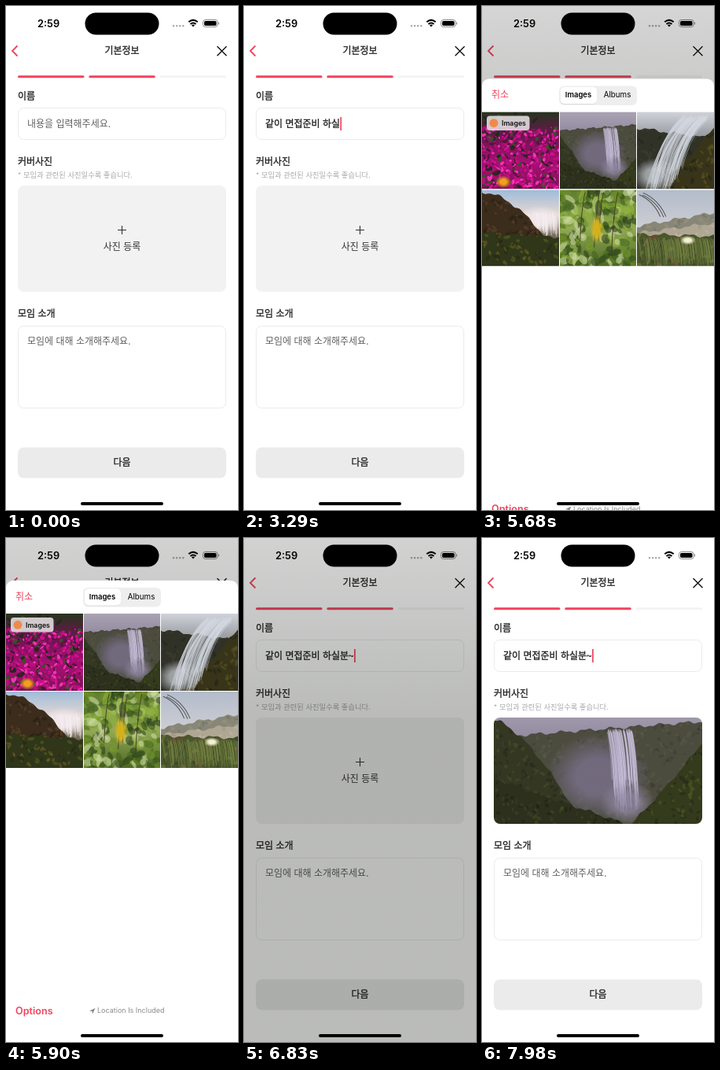
Recreate the animation shown at these times as an HTML page with a canvas. Size 295 by 640 pixels, loop 8000 ms.

```html
<!DOCTYPE html>
<html lang="ko">
<head>
<meta charset="utf-8">
<title>기본정보</title>
<style>
  html, body { margin: 0; width: 100%; height: 100%; overflow: hidden; background: #fff; }
  #stage { position: relative; width: 295px; height: 640px; overflow: hidden; background: #fff; }
  #stage > *, #sheet > svg { position: absolute; left: 0; top: 0; }
  svg { display: block; }
  text { font-family: "Noto Sans CJK KR", "Noto Sans CJK", "Noto Sans KR", sans-serif; font-size: 12px; fill: #333; }
  .en { font-family: Inter, sans-serif; }
  .bold { font-weight: 600; }
  .mid { text-anchor: middle; }
  .medium { fill: #222; stroke: #222; stroke-width: .3px; }
  .hint { fill: #606060; }
  .red { fill: #f0435d; }
  .field { fill: #fff; stroke: #ebebeb; }
  #name { white-space: pre; }
  #stage > #cover { left: 15px; top: 228px; width: 265px; height: 135px; border-radius: 8px; }
  #dim { width: 295px; height: 640px; background: linear-gradient(#0a0f08aa, #0a0f08 35%); }
  #sheet { width: 295px; height: 640px; background: #fff; border-radius: 9px 9px 0 0; }
  #grid { position: absolute; top: 42px; width: 295px; display: grid; grid-template-columns: repeat(3, 1fr); gap: 1px; }
  #grid canvas { display: block; width: 100%; aspect-ratio: 1; }
</style>
</head>
<body>
<div id="stage">
  <svg width="295" height="640">
    <path d="M14.5 50.500 8 57l6.500 6.500" fill="none" stroke="#f0435d" stroke-width="1.800"/>
    <path d="M268.500 51.200l12 12m0-12-12 12" stroke="#111" stroke-width="1.400"/>
    <text class="mid medium" x="147.500" y="61.300">기본정보</text>
    <g class="red">
      <rect x="15" y="88.300" width="84.500" height="3" rx="1.500"/>
      <rect x="105.300" y="88.300" width="84.500" height="3" rx="1.500"/>
      <rect x="195.600" y="88.300" width="84.500" height="3" rx="1.500" fill="#f3f3f3"/>
    </g>
    <text class="medium" x="15" y="118.500">이름</text>
    <rect class="field" x="15.500" y="129.500" width="264" height="40" rx="7"/>
    <text id="name" x="27" y="154"></text>
    <rect id="caret" class="red" y="141" width="1.700" height="17"/>
    <text class="medium" x="15" y="201.500">커버사진</text>
    <text x="15" y="217.800" style="font-size:9.3px;fill:#a9a9a9">* 모임과 관련된 사진일수록 좋습니다.</text>
    <rect x="15" y="228" width="265" height="135" rx="8" fill="#f2f2f2"/>
    <path d="M142 284.500h11m-5.500-5.500v11" stroke="#333" stroke-width="1.100"/>
    <text class="mid" x="147.500" y="309.800">사진 등록</text>
    <text class="medium" x="15" y="395">모임 소개</text>
    <rect class="field" x="15.500" y="406.500" width="264" height="104" rx="7"/>
    <text class="hint" x="27" y="430">모임에 대해 소개해주세요.</text>
    <rect x="15" y="560.500" width="265" height="39" rx="8" fill="#ebebeb"/>
    <text class="mid medium" x="147.500" y="584.300">다음</text>
    <text class="en bold" x="40" y="26.500" style="font-size:12.8px;fill:#000">2:59</text>
    <path d="M213 25.200h12.500" stroke="#aaa" stroke-width="2.600" stroke-linecap="round" stroke-dasharray="0 4.100"/>
    <g fill="none" stroke="#000" stroke-width="2">
      <path d="M232.300 20.300q5.700-4.800 11.400 0M234.500 23q3.500-2.900 7 0"/>
      <path d="M235.900 24.300q2.100-1.500 4.200 0l-2.100 2.200z" fill="#000" stroke="none"/>
      <rect x="250.500" y="17.500" width="18.500" height="9" rx="3" stroke="#888" stroke-width="1"/>
      <rect x="252" y="19" width="15.500" height="6" rx="1.700" fill="#000" stroke="none"/>
      <path d="M270.500 20.500v3" stroke="#999" stroke-width="1.200"/>
    </g>
  </svg>
  <canvas id="cover" width="530" height="270"></canvas>
  <div id="dim"></div>
  <div id="sheet">
    <div id="grid"></div>
    <svg width="295" height="640">
      <text class="red" x="12" y="24.500">취소</text>
      <rect x="98" y="9" width="99" height="24.500" rx="6" fill="#eeeeef"/>
      <rect x="100" y="11" width="46" height="21.500" rx="5" fill="#0001"/>
      <rect x="100" y="10.500" width="46" height="21" rx="5" fill="#fff"/>
      <text class="en bold mid" x="122.500" y="24" style="font-size:9.5px;fill:#000">Images</text>
      <text class="en mid" x="172" y="24" style="font-size:9.8px;fill:#000">Albums</text>
      <rect x="6" y="47" width="54.500" height="18.500" rx="4" fill="#e2dcdfe6"/>
      <circle cx="15" cy="56.300" r="5.500" fill="#f08a4b"/>
      <text class="en bold" x="25" y="59.600" style="font-size:8.8px;fill:#111">Images</text>
      <text class="en bold red" x="12" y="550.700" style="font-size:12.6px">Options</text>
      <path d="M106 546.500l7.500-3.500-3.500 7.500-.5-3.500z" fill="#888"/>
      <text class="en" x="116" y="549.300" style="font-size:9px;fill:#8b8b8b">Location Is Included</text>
    </svg>
  </div>
  <svg width="295" height="640">
    <rect x="100.500" y="8.500" width="94" height="28" rx="14"/>
    <rect x="95" y="630" width="105" height="4" rx="2"/>
  </svg>
</div>
<script>
const $ = id => document.getElementById(id);

let seed = 7;
const rand = () => (seed = seed * 16807 % 2147483647) / 2147483647;

// A drawing surface of w by h units at double resolution.
function surface(w, h) {
  const canvas = document.createElement('canvas');
  canvas.width = w * 2;
  canvas.height = h * 2;
  const c = canvas.getContext('2d');
  c.scale(2, 2);

  function sky(...colors) {
    const g = c.createLinearGradient(0, 0, 0, h);
    colors.forEach((color, i) => g.addColorStop(i / (colors.length - 1), color));
    c.fillStyle = g;
    c.fillRect(0, 0, w, h);
  }
  function specks(n, size, top, ...colors) {
    for (let i = 0; i < n; i++) {
      c.fillStyle = colors[i % colors.length];
      c.beginPath();
      c.ellipse(rand() * w, top + rand() * (h - top), size * (.5 + rand()), size * (.3 + rand() * .5), rand() * 3, 0, 7);
      c.fill();
    }
  }
  // Textured ground under a rough line from the left edge to the right edge.
  function ridge(left, right, curve, color, ...texture) {
    const phase = rand() * 6;
    c.save();
    c.beginPath();
    c.moveTo(0, h);
    for (let x = 0; x <= w; x++) {
      const u = x / w;
      const share = left > right ? 1 - (1 - u) ** curve : u ** curve;
      c.lineTo(x, left + (right - left) * share + Math.sin(x / 5 + phase) * 1.5 + Math.sin(x / 2) * .8);
    }
    c.lineTo(w, h);
    c.fillStyle = color;
    c.fill();
    c.clip();
    specks(w * h / 70, 3, 0, ...texture);
    c.restore();
  }
  function glow(color, x, y, rx, ry) {
    c.save();
    c.translate(x, y);
    c.scale(rx, ry);
    const g = c.createRadialGradient(0, 0, 0, 0, 0, 1);
    g.addColorStop(.4, color);
    g.addColorStop(1, color.slice(0, 7) + '00');
    c.fillStyle = g;
    c.fillRect(-1, -1, 2, 2);
    c.restore();
  }
  function streaks(n, color, x, y, spread, dx, dy) {
    c.strokeStyle = color;
    for (let i = 0; i < n; i++) {
      const x0 = x + rand() * spread, y0 = y + rand() * 6, k = .6 + rand() * .4;
      c.beginPath();
      c.moveTo(x0, y0);
      c.quadraticCurveTo(x0 + dx * k * .7, y0 + dy * k * .3, x0 + dx * k, y0 + dy * k);
      c.stroke();
    }
  }
  return { canvas, sky, specks, ridge, glow, streaks };
}

function valley(p) {
  p.sky('#aaa3b4', '#8d849a', '#655d6c', '#35332b');
  p.ridge(46, 26, 1, '#4b4b3e', '#5c624966', '#3736305c');
  p.glow('#756c82ee', 132, 96, 68, 56);
  p.streaks(90, '#c8c0dc88', 144, 35, 32, 10, 100);
  p.glow('#958ba8bb', 170, 130, 36, 28);
  p.ridge(24, 500, 1.5, '#343823', '#50582d66', '#22251c77');
  p.ridge(330, 52, 1 / 1.1, '#343a1c', '#52602777', '#1e231477');
  p.ridge(98, 190, 1, '#2c301c', '#46522677', '#191d1577', '#45403077');
}
function flowers(p) {
  p.sky('#28351f', '#6e1550', '#a90f76', '#74164f');
  p.specks(60, 4, 0, '#3d4d2b', '#202b1b');
  p.specks(430, 2.5, 18, '#d60e92', '#a60c70', '#ee36b2', '#571440', '#b9107d');
  p.glow('#f2a01cff', 27, 88, 10, 8);
}
function stream(p) {
  p.sky('#d0d3da', '#777a7c', '#34352a');
  p.ridge(20, 34, 1, '#303127', '#45463566', '#1c1f1866');
  p.ridge(130, 20, 1, '#38341a', '#645a2077', '#1d1e1377');
  p.streaks(110, '#d4d8e26e', 58, 4, 32, -52, 100);
  p.glow('#d5d9e1aa', 22, 80, 28, 22);
}
function sunset(p) {
  p.sky('#9fbcd9', '#e6d9d3', '#5b523f', '#2c301a');
  p.glow('#f3e8ecee', 74, 38, 30, 18);
  p.streaks(30, '#f5eef299', 55, 28, 40, 2, 28);
  p.ridge(3, 85, 1.8, '#3b2c1c', '#66482b77', '#1d1b1477');
  p.ridge(54, 60, 1, '#303619', '#606b2277', '#20261677', '#7963297a');
}
function leaves(p) {
  p.sky('#5d7c2d', '#93ab55', '#4d6825');
  p.specks(200, 7, 0, '#92b3409a', '#4666219a', '#cbd9a39a', '#6f90299a', '#2c42199a');
  p.streaks(4, '#493f25', 20, 0, 55, -10, 97);
  p.glow('#d3b11bff', 47, 50, 9, 19);
}
function dune(p) {
  p.sky('#b3bccb', '#cdced4', '#8b8b70');
  p.ridge(46, 29, 1, '#888777', '#9b978077', '#70736577');
  p.ridge(55, 42, 1, '#b0a694', '#c4b9a577', '#99917f77');
  p.ridge(56, 59, 1, '#4a562c', '#78864177', '#303c2177', '#84403f66');
  p.streaks(90, '#7c8b4788', 0, 60, 97, 5, 35);
  p.streaks(3, '#555', 0, 2, 8, 40, 42);
  p.glow('#f4f0d4ff', 64, 64, 10, 6);
}

const wide = surface(265, 177);
valley(wide);
$('cover').getContext('2d').drawImage(wide.canvas, 0, -42);

const square = draw => {
  const photo = surface(97, 97);
  draw(photo);
  return photo.canvas;
};
const thumb = p => p.canvas.getContext('2d').drawImage(wide.canvas, 88, 0, 354, 354, 0, 0, 97, 97);
$('grid').append(...[flowers, thumb, stream, sunset, leaves, dune].map(square));

// Every state of a Korean keyboard while it composes the text, one per key press.
function keyStates(text) {
  const initials = 'ㄱㄲㄴㄷㄸㄹㅁㅂㅃㅅㅆㅇㅈㅉㅊㅋㅌㅍㅎ';
  const states = [];
  let done = '';
  for (const char of text) {
    const code = char.charCodeAt(0) - 0xac00;
    if (code >= 0 && code < 11172) {
      const tail = code % 28;
      states.push(done + initials[Math.floor(code / 588)]);
      if (tail) states.push(done + String.fromCharCode(0xac00 + code - tail));
    }
    done += char;
    states.push(done);
  }
  return states;
}
const phrase = '같이 면접준비 하실';
const keys = keyStates(phrase);
const ending = keyStates('분').map(s => phrase + s);

function typed(t) {
  if (t < 1180) return '';
  if (t >= 5120) return phrase + '분~';
  if (t >= 4080) return ending[Math.min(Math.floor((t - 4080) / 55), ending.length - 1)];
  return keys[Math.min(Math.floor((t - 1180) / 95.5), keys.length - 1)];
}

const within = (t, from, to) => t >= from && t < to;
const caretOn = t => t >= 390 && !within(t, 3930, 4080) && !within(t, 7540, 7980);

// Share of the way the sheet still has to go, and strength of the shade behind it.
function overlay(t) {
  if (within(t, 5260, 5900)) {
    const s = .55 + .966 * Math.floor((t - 5260) / 105);
    const away = (1 + s) * Math.exp(-s);
    return [away, 1 - away];
  }
  if (within(t, 5900, 6830)) return [0, 1];
  if (within(t, 6830, 7390)) return [1, (1 - Math.floor((t - 6830) / 112) / 5) ** 1.5];
  return [1, 0];
}

let shown = null;
function showName(text) {
  if (text === shown) return;
  shown = text;
  const name = $('name');
  name.textContent = text || '내용을 입력해주세요.';
  name.setAttribute('class', text ? 'medium' : 'hint');
  $('caret').setAttribute('x', text ? 27.3 + name.getComputedTextLength() : 27);
}

function render(t) {
  showName(typed(t));
  const [away, dim] = overlay(t);
  $('caret').style.opacity = +caretOn(t);
  $('sheet').style.transform = `translateY(${54 + 586 * away}px)`;
  $('dim').style.opacity = dim * .28;
  $('cover').style.visibility = t >= 7540 ? 'visible' : 'hidden';
}

const start = performance.now();
function tick() {
  render((performance.now() - start) % 8000);
  requestAnimationFrame(tick);
}
tick();
</script>
</body>
</html>
```
